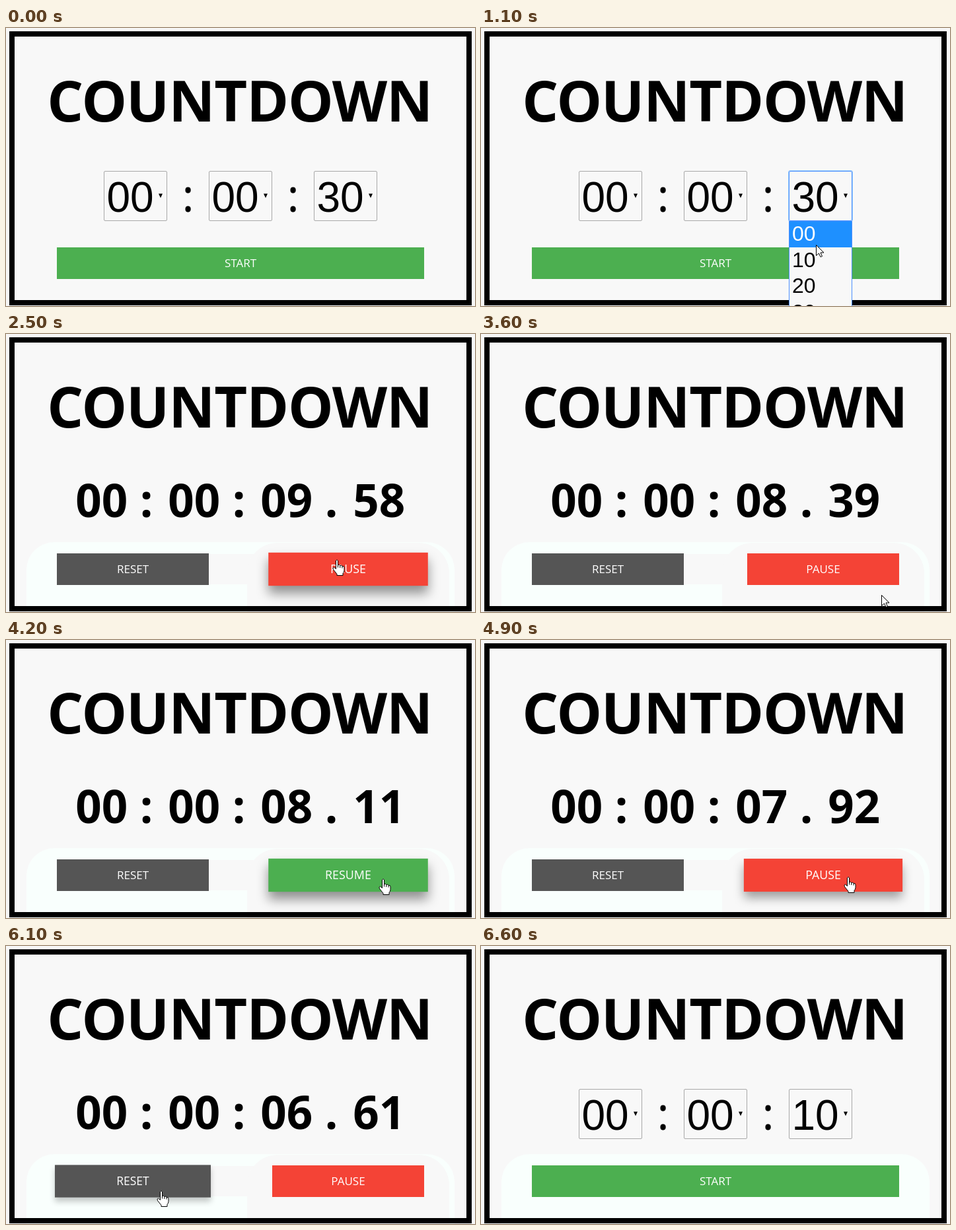
These frames come from a looping animation (710x422 px, 7.5 s). An HTML page:

```html
<!DOCTYPE html>
<html lang="en">
<head>
<meta charset="utf-8">
<title>Countdown</title>
<style>
  html, body { margin: 0; width: 100%; height: 100%; overflow: hidden; background: #f8f8f8; }
  #stage { position: relative; width: 710px; height: 422px; overflow: hidden; }
  svg { position: absolute; left: 0; top: 0; }
  text { font-family: "Open Sans", "Noto Sans", sans-serif; }
  .title { font-size: 86.3px; font-weight: 700; letter-spacing: -1.1px; text-anchor: middle; }
  #clock { font-size: 69px; font-weight: 700; }
  .mid { text-anchor: middle; }
  .sep { font-size: 70px; text-anchor: middle; }
  .pick, .item { font-family: "Liberation Sans", Arial, sans-serif; font-size: 64px; }
  .item { font-size: 32px; }
  .btn {
    position: absolute; left: 77px; top: 333px; width: 230px; height: 48px;
    font: 500 17px/48px "Open Sans", "Noto Sans", sans-serif;
    color: #fff; text-align: center;
  }
  #start { width: 556px; background: #4caf50; }
  #reset { background: #555; }
  #pause { left: 403px; }
</style>
</head>
<body>
<div id="stage">
  <svg width="710" height="422">
    <g id="halo">
      <rect x="31" y="316" width="648" height="150" rx="42" fill="#f9fffd"/>
      <g id="gap" fill="#f8f8f8">
        <rect x="77" y="334" width="556" height="46"/>
        <rect x="365" y="317" width="306" height="150" rx="46"/>
      </g>
    </g>
    <text class="title" x="353.7" y="142">COUNTDOWN</text>
    <g id="setup"></g>
    <g id="clock"></g>
  </svg>

  <div class="btn" id="start">START</div>
  <div class="btn" id="reset">RESET</div>
  <div class="btn" id="pause"></div>

  <svg width="710" height="422">
    <rect x="9" y="9" width="692" height="408" fill="none" stroke="#000" stroke-width="8"/>
    <rect id="ring" x="465.5" y="216.5" width="97" height="77" rx="2" fill="none" stroke="#1e90ff" stroke-opacity=".45"/>
    <g id="list">
      <rect x="466.5" y="293.5" width="95" height="160" fill="#f8f8f8" stroke="#4d90fe"/>
      <rect id="mark" x="467" width="94" height="39.5" fill="#1e90ff"/>
      <g id="items"></g>
    </g>
    <g id="cursor" stroke="#000" stroke-linejoin="round">
      <path id="arrow" fill="#fff" d="M0 0V16L4 12.5 6.5 18 9 17 6.5 11.5H11.5Z"/>
      <g id="hand" transform="translate(-1.5 -2)">
        <path fill="#fff" d="M-1.5 14V1.5Q0-1 1.5 1.5V8.5Q3.5 6.5 4.7 9Q7 7.5 8 10Q11 9.5 11 12V16Q11 19 9 21V24H0V22L-5.5 15Q-7 12-4.5 11.5Z"/>
        <path fill="none" d="M1.5 8.5V12M4.7 9V12.5M8 10V13"/>
      </g>
    </g>
  </svg>
</div>

<script>
const LOOP = 7500, STEP = 100;
// Clicks and other turning points of the session
const ENTER = 200, FOCUS = 500, OPEN = 700, CHOOSE = 1700, RUN = 2117,
      HOLD = 3850, RESUME = 4720, STOP = 6250, EXIT = 6600;
const RATE = 0.001088; // clock seconds per millisecond
const ROW = 39.5, LIST_TOP = 293.5;

const $ = id => document.getElementById(id);
const show = (id, on) => { $(id).style.display = on ? '' : 'none'; };
const within = (t, a, b) => t >= a && t < b;
const clamp = v => Math.min(1, Math.max(0, v));
const rise = p => 1 - (1 - clamp(p)) ** 2.4;
const glide = p => (p = clamp(p)) * p * (3 - 2 * p);
const two = n => String(n).padStart(2, '0');
const repeat = (n, f) => Array.from({ length: n }, (_, i) => f(i)).join('');

const picker = x => `
  <rect x="${x + .5}" y="217.5" width="95" height="75" rx="1.5" fill="none" stroke="#a9a9a9"/>
  <text class="pick" x="${x + 4.5}" y="279">00</text>
  <path d="M${x + 83} 251.5h6l-3 6.5z"/>`;

$('setup').innerHTML = repeat(3, i => picker(148 + 159 * i)) +
  repeat(2, i => `<text class="sep" x="${275.5 + 159 * i}" y="279">:</text>`);
$('clock').innerHTML =
  repeat(4, i => `<text class="cell" x="${105.3 + 140 * i}" y="278.4">00</text>`) +
  repeat(3, i => `<text class="mid" x="${212.5 + 140 * i}" y="278.4">${'::.'[i]}</text>`);
$('items').innerHTML =
  repeat(4, i => `<text class="item" x="471" y="${323 + i * ROW}">${i}0</text>`);

const box = $('setup').querySelectorAll('rect')[2];
const picked = $('setup').querySelectorAll('.pick')[2];
const cells = $('clock').querySelectorAll('.cell');

// Pointer moves: begin, end, x, y; it rests in between
const moves = [
  [ENTER, FOCUS, 545, 258], [OPEN, 1100, 507, 329], [1100, 1300, 506, 350],
  [2000, 2500, 502, 344], [2800, 3600, 606, 396], [3600, 4000, 572, 364],
  [4400, 4900, 557, 361], [4900, 5100, 556, 424], [5200, 6100, 236, 373],
  [6300, EXIT, 210, 430]
];

// Hover spans: enter, leave
const hovers = {
  start: [[1640, RUN], [STOP, 6400]],
  reset: [[6020, STOP]],
  pause: [[RUN, 3320], [HOLD, RESUME], [RESUME, 4960]]
};

function pointer(t) {
  let x = 668, y = 262;
  for (const [a, b, tx, ty] of moves) {
    const p = glide((t - a) / (b - a));
    x += (tx - x) * p;
    y += (ty - y) * p;
  }
  return [x, y];
}

function drawButton(id, t) {
  const [on, off] = hovers[id].filter(s => s[0] <= t).pop() || [t, t];
  const k = rise((Math.min(t, off) - on) / 300) * (1 - rise((t - off) / 170));
  const s = $(id).style;
  s.transform = k ? `scale(${1 + .05 * k})` : 'none';
  s.boxShadow = k ? `0 ${11 * k}px ${16 * k}px rgba(0,0,0,${.42 * k})` : 'none';
}

function drawClock(t) {
  const ran = Math.max(0, Math.min(t, HOLD) - RUN) + Math.max(0, t - RESUME);
  const left = Math.round((10 - ran * RATE) * 100);
  cells[2].textContent = two(Math.floor(left / 100));
  cells[3].textContent = two(left % 100);
}

function drawPicker(t, y) {
  const row = y < LIST_TOP ? 3 : Math.floor((y - LIST_TOP) / ROW);
  box.setAttribute('stroke', within(t, FOCUS, RUN) ? '#4d90fe' : '#a9a9a9');
  picked.textContent = t < CHOOSE ? '30' : '10';
  show('ring', within(t, OPEN, RUN));
  show('list', within(t, OPEN, CHOOSE));
  $('mark').setAttribute('y', LIST_TOP + row * ROW);
  [...$('items').children].forEach((el, i) => el.setAttribute('fill', i === row ? '#fff' : '#000'));
}

function drawCursor(t, x, y) {
  const hand = t >= CHOOSE && within(y, 333, 383);
  $('cursor').setAttribute('transform', `translate(${Math.round(x) + .5} ${Math.round(y) + .5})`);
  show('cursor', within(t, ENTER, EXIT));
  show('hand', hand);
  show('arrow', !hand);
}

function draw(t) {
  const running = within(t, RUN, STOP), held = within(t, HOLD, RESUME);
  const [x, y] = pointer(t);
  for (const id of ['setup', 'start']) show(id, !running);
  for (const id of ['clock', 'reset', 'pause', 'gap']) show(id, running);
  show('halo', t >= CHOOSE);
  $('pause').textContent = held ? 'RESUME' : 'PAUSE';
  $('pause').style.background = held ? '#4caf50' : '#f44336';
  Object.keys(hovers).forEach(id => drawButton(id, t));
  drawPicker(t, y);
  drawClock(t);
  drawCursor(t, x, y);
}

let last = -1;
function tick() {
  // Look one display refresh ahead
  const t = Math.floor((performance.now() + 17) % LOOP / STEP) * STEP;
  if (t !== last) draw(last = t);
  requestAnimationFrame(tick);
}
tick();
</script>
</body>
</html>
```
